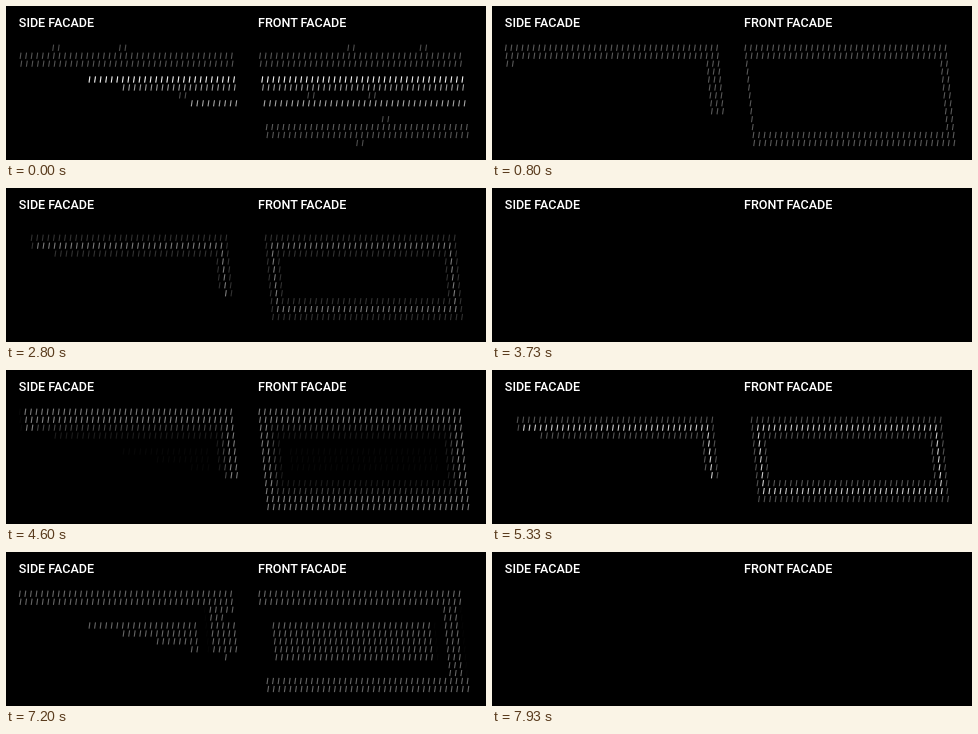
An HTML page with a canvas for the animation above (8000 ms loop, 480 by 154 pixels).

```html
<!DOCTYPE html>
<html lang="en">
<head>
<meta charset="utf-8">
<title>Facades</title>
<style>
  html, body { margin: 0; width: 100%; height: 100%; overflow: hidden; background: #000; }
  canvas, svg { position: absolute; left: 0; top: 0; width: 480px; height: 154px; }
  text { font: 500 12.55px Roboto, sans-serif; fill: #fff; }
</style>
</head>
<body>
<canvas width="480" height="154"></canvas>
<svg viewBox="0 0 480 154"><text x="12.8" y="21">SIDE FACADE</text><text x="252" y="21">FRONT FACADE</text></svg>
<script>
const ctx = document.querySelector('canvas').getContext('2d');
const LOOP = 8000, STEP = 1000 / 15, FULL = 0.8;
const clamp = v => Math.max(0, Math.min(1, v));
const ramp = (t, from, to) => clamp((t - from) / (to - from));
const mix = (a, b, k) => a + (b - a) * k;

const side = {
  x: 13.8, cols: 39, rows: 9,
  has: (c, r) => c >= 6 * (r - 2),
  outer: (c, r) => r < 2 || c > 35 || (r === 2 && c < 2),
  inner: (c, r) => r > 3 && r < 8 && c < 34,
  depth: (c, r) => Math.min(r, c - 1, 38 - c, 5),
  sparks: [[6, 0], [18, 0], [28, 6]]
};
const front = {
  x: 253.3, cols: 37, rows: 13,
  has: () => true,
  outer: (c, r) => r < 2 || r > 10 || c < 1 || c > 34,
  inner: (c, r) => r > 3 && r < 9 && c > 3 && c < 33,
  depth: (c, r) => Math.min(r, 12 - r, c, 36 - c, 5),
  sparks: [[16, 0], [29, 0], [8, 6], [19, 6], [21, 9], [16, 12]]
};
const rowLevels = [0, .33, .33, 0, .95, .6, 0, .65, 0, 0, .36, .33, 0];

// Outer frame and core; the core fades sooner than the frame.
const home = (f, c, r, level) =>
  f.outer(c, r) ? level : f.inner(c, r) ? Math.max(0, level * 1.7 - 0.67) : 0;

// Concentric wave, brightest at depth p.
const wave = (f, c, r, p) =>
  Math.max(0, Math.cos((f.depth(c, r) - p) * Math.PI / 3)) ** 1.3;

const ring = (f, c, r) => wave(f, c, r, 2);

function scan(f, c, r, t) {
  const k = Math.round(t / STEP);
  const spark = k < 3 && f.sparks.some(([sc, sr]) => sr === r && (c === sc || c === sc + 1));
  const level = spark ? 0.3 : rowLevels[(r - k + 13) % 13];
  return mix(level, home(f, c, r, FULL), ramp(t, 200, 533));
}

function pulse(f, c, r, t) {
  const q = (t - 667) % 1400;
  const swap = ramp(q, 1000, 1267);
  const frame = FULL * (Math.pow(1 - ramp(q, 0, 267), 1.2) + swap);
  const middle = 0.8 * ramp(q, 533, 867) * (1 - swap);
  return Math.max(home(f, c, r, frame), ring(f, c, r) * middle);
}

function ripple(f, c, r, t) {
  const p = -0.3 + 18 * (t - 4533) / 1733;
  return 0.8 * mix(ring(f, c, r), wave(f, c, r, p), ramp(t, 4467, 4667));
}

function slide(f, c, r, t) {
  const back = t >= 7133;
  const u = ramp(t, back ? 7133 : 6267, back ? 8000 : 7133);
  const shift = f.cols * Math.pow(u, 1.15) * (back ? -1 : 1);
  const pos = c - shift, left = Math.floor(pos);
  const lit = i => {
    const col = (i % f.cols + f.cols) % f.cols;
    return f.outer(col, r) || f.inner(col, r) ? 1 : 0;
  };
  return 0.4 * mix(lit(left), lit(left + 1), pos - left) * (1 - ramp(t, 7333, 7930));
}

const sceneAt = t => t < 667 ? scan : t < 4467 ? pulse : t < 6266 ? ripple : slide;

function drawFacade(f, t) {
  const scene = sceneAt(t);
  for (let r = 0; r < f.rows; r++) {
    for (let c = 0; c < f.cols; c++) {
      if (!f.has(c, r)) continue;
      const level = clamp(scene(f, c, r, t));
      if (level < 0.02) continue;
      const x = f.x + c * 5.56 + r * 0.74, y = 41.8 + r * 7.93;
      ctx.globalAlpha = level;
      ctx.beginPath();
      ctx.moveTo(x + 0.45, y - 3.1);
      ctx.lineTo(x - 0.45, y + 3.1);
      ctx.stroke();
    }
  }
}

function draw() {
  const t = Math.floor((performance.now() % LOOP) / STEP + 0.1) * STEP % LOOP;
  ctx.clearRect(0, 0, 480, 154);
  ctx.strokeStyle = '#fff';
  ctx.lineWidth = 1.1;
  drawFacade(side, t);
  drawFacade(front, t);
  requestAnimationFrame(draw);
}
draw();
</script>
</body>
</html>
```
